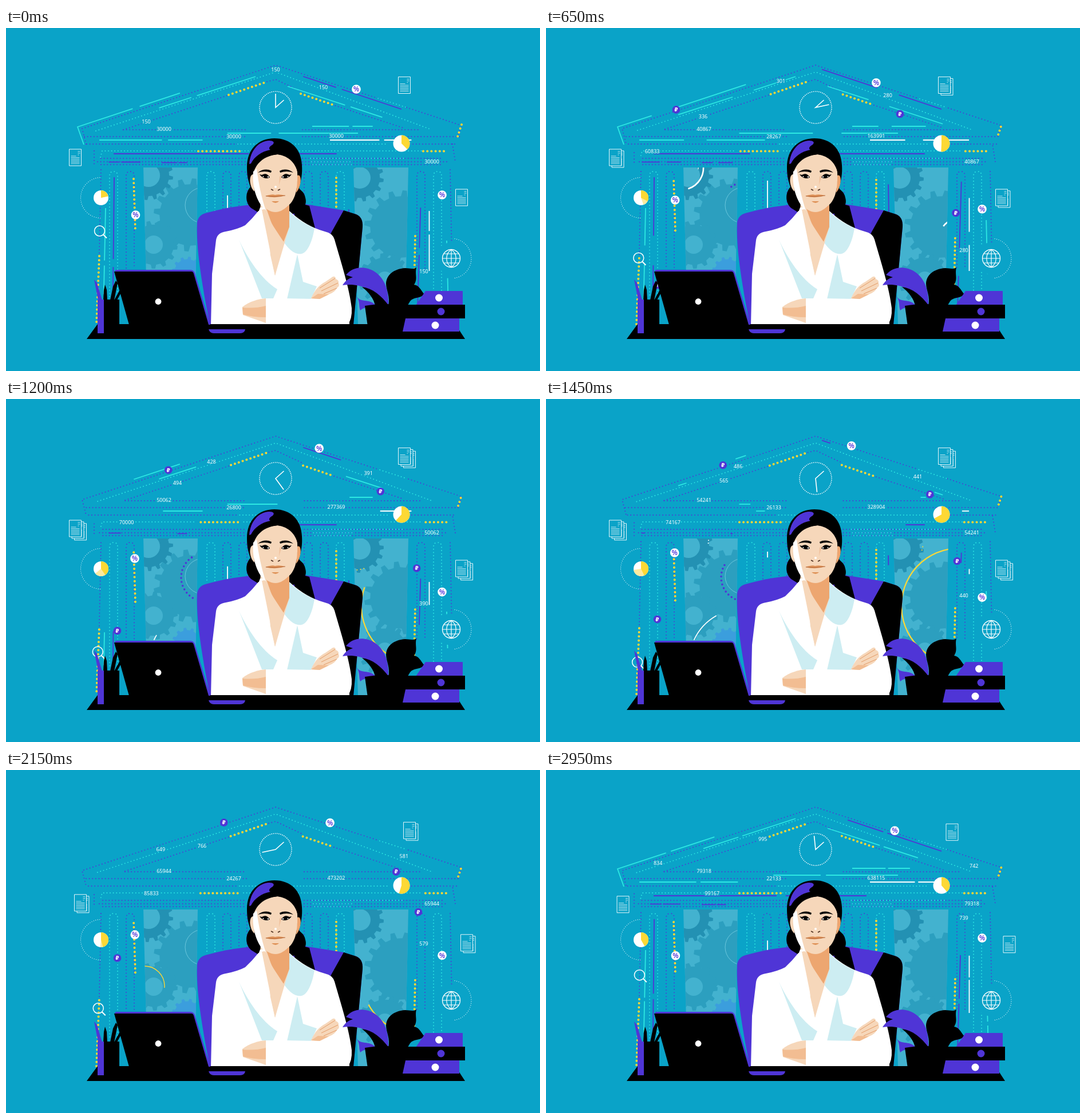
These frames come from a looping animation (933x600 px, 3000 ms). An HTML page with a canvas:

```html
<!DOCTYPE html>
<html lang="en">
<head>
<meta charset="utf-8">
<title>Bank manager</title>
<style>
html, body { margin: 0; width: 100%; height: 100%; overflow: hidden; background: #0aa3c8; }
canvas { display: block; }
</style>
</head>
<body>
<canvas id="stage" width="933" height="600"></canvas>
<script>
const c = document.getElementById('stage').getContext('2d');
const LOOP = 3000, STEP = 50, TAU = Math.PI * 2, AXIS = 471;
const BG = '#0aa3c8', BLUE = '#4f35d6', CYAN = '#2de8e2', YELLOW = '#fdd835', WHITE = '#fff', BLACK = '#000';
const SKIN = '#f6d7ba', TAN = '#eda670', PALE = '#cdedf2', PEACH = '#f2bd92', LIP = '#df9258';

const clamp = v => Math.max(0, Math.min(1, v));
const mix = (a, b, u) => a + (b - a) * u;
const rad = deg => deg * Math.PI / 180;
// Rises to 1 at the peak, falls back to 0 at the end of the loop
const swing = (t, peak) => t < peak ? t / peak : (LOOP - t) / (LOOP - peak);

function fill(d, color) {
  c.fillStyle = color;
  c.fill(new Path2D(d));
}

function stroke(path, color, width, dash = [], offset = 0) {
  c.strokeStyle = color;
  c.lineWidth = width;
  c.lineCap = dash[0] === 0 ? 'round' : 'butt';
  c.setLineDash(dash);
  c.lineDashOffset = offset;
  c.stroke(typeof path === 'string' ? new Path2D(path) : path);
}

function disc(x, y, r, color) {
  c.fillStyle = color;
  c.beginPath();
  c.arc(x, y, r, 0, TAU);
  c.fill();
}

function ring(x, y, r, color, width, from = 0, to = 360, gap = 0) {
  const path = new Path2D();
  path.arc(x, y, r, rad(from), rad(to));
  stroke(path, color, width, gap ? [0, gap] : []);
}

function label(text, x, y, color, font) {
  c.font = font;
  c.textAlign = 'center';
  c.fillStyle = color;
  c.fillText(text, x, y);
}

// ---- Windows with gears ----
function gear(x, y, r, teeth, color, turn, hole = 0) {
  const pitch = TAU / teeth;
  c.beginPath();
  for (let i = 0; i < teeth; i++) {
    for (const [p, k] of [[0, .84], [.12, 1], [.42, 1], [.54, .84]]) {
      const a = (turn + i + p) * pitch;
      c.lineTo(x + r * k * Math.cos(a), y + r * k * Math.sin(a));
    }
  }
  c.closePath();
  c.moveTo(x + hole, y);
  c.arc(x, y, hole, 0, TAU, true);
  c.fillStyle = color;
  c.fill('evenodd');
}

// An arc that grows from one angle to another, waits, and shrinks after its start
function sweep(t, start, span, x, y, r, a, b, color, width, gap) {
  const s = (t - start) / span;
  const p = mix(a, b, clamp((s - .75) / .25)), q = mix(a, b, clamp(s / .6));
  if (s > 0 && s < 1) ring(x, y, r, color, width, Math.min(p, q), Math.max(p, q), gap);
}

function drawWindows(t) {
  const turn = t / LOOP * 4, deep = '#2391b3', mid = '#2c9fbf';
  c.save();
  c.clip(new Path2D('M240 244H335L330 519H247ZM607 244H703L697 519H615Z'));
  fill('M230 240H710V520H230Z', '#43b2cf');
  gear(322, 327, 64, 16, mid, -turn);
  gear(249, 258, 43, 16, deep, turn, 20);
  gear(258, 379, 42, 13, mid, turn, 16);
  gear(317, 427, 27, 12, '#3b9edd', -turn);
  ring(344, 310, 31, '#6bc6dc', 1);
  gear(690, 348, 64, 16, mid, -turn);
  gear(618, 262, 42, 15, deep, turn, 19);
  gear(662, 440, 46, 14, mid, turn, 14);

  sweep(t, 50, 1150, 237, 245, 38, -10, 85, WHITE, 2.6);
  sweep(t, 600, 550, 237, 245, 29, -10, 85, WHITE, 1.2);
  sweep(t, 1400, 500, 240, 246, 44, -5, 85, WHITE, 2, 5);
  sweep(t, 600, 1050, 348, 312, 42, 245, 115, BLUE, 3.6, 7);
  sweep(t, 1150, 850, 345, 462, 95.5, 205, 265, WHITE, 1.6);
  sweep(t, 1900, 400, 242, 378, 35, -90, 5, YELLOW, 1.4);
  sweep(t, 600, 500, 722, 368, 35, 235, 130, WHITE, 2.6);
  for (const start of [700, 1400]) sweep(t, start, 530, 610, 250, 49, 10, 90, YELLOW, 2, 6);
  sweep(t, 900, 900, 722, 362, 101, 120, 262, YELLOW, 2.2);
  sweep(t, 1900, 600, 722, 362, 101, 120, 165, YELLOW, 2.2);
  c.restore();
}

// ---- Dotted building ----
function drawBuilding(t) {
  const dots = (d, color, width = 1.9, gap = 5.6) => stroke(d, color, width, [0, gap], t / LOOP * 16 * gap);
  const arch = (x, foot, color) => dots(`M${x} ${foot}V259Q${x} 251 ${x + 7} 251T${x + 14} 259V${foot}`, color);

  // Roof
  dots('M140 203L133 176L471 65L650 123M700 139L797 171L788 190', BLUE);
  dots('M157 180L471 77L744 178M650 123L700 139', CYAN);
  dots('M205 178L390 117M456 94L471 90L516 111M570 134L695 175', BLUE);

  // Beams
  for (const [y, inset] of [[178, 205], [190, 137], [228, 166], [234, 160], [239, 166]]) {
    dots(`M${inset} ${y}H420M518 ${y}H${930 - inset}`, BLUE);
  }
  dots('M141 203H405M700 203H787M154 215V240M780 203L785 234', BLUE);
  dots('M405 203H668M165 226L168 215H333M412 215H728', CYAN);
  dots('M532 228H696M534 234H606M536 239H606', CYAN);

  // Columns, mirrored around the middle
  for (const side of [1, -1]) {
    c.save();
    c.translate(AXIS, 0);
    c.scale(side, 1);
    c.translate(-AXIS, 0);
    dots('M166 248L163 398', BLUE);
    arch(181, 470, CYAN);
    arch(210, 420, BLUE);
    arch(351, 320, CYAN);
    arch(379, 316, BLUE);
    arch(407, 316, BLUE);
    c.restore();
  }

  for (const d of ['M389 117L456 94', 'M515 115L572 134.5', 'M336 215.5H410', 'M729 215.5H770', 'M796 169L789 190',
    'M223 264L226 356', 'M163 399L158 518', 'M715 364L713 452', 'M577 262V318']) dots(d, YELLOW, 4, 7.2);

  ring(166, 297, 35.5, WHITE, 1.2, 92, 268, 3.6);
  ring(778, 403, 35, WHITE, 1.2, -80, 80, 3.6);
}

// ---- Running lines: pulses travel along each path ----
const meter = document.createElementNS('http://www.w3.org/2000/svg', 'path');
const runs = Object.entries({
  [CYAN]: 'M136 204L125 173L358 96 M436 85L224 154 M492 102L700 170 M535 172H668 M615 184H328 M163 196H390 M174 315L170 505 M774 539L769 329',
  [BLUE]: 'M691 142L475 70 M188 220H678 M235 234.5H165 M272 235.5H328 M189 261L186 558 M602 520L598 265 M718 525L726 260',
  [WHITE]: 'M566 196H745 M387 412V262 M739.5 425V293'
}).flatMap(([color, paths]) => paths.split(' M').map(d => {
  d = d.replace(/^M?/, 'M');
  meter.setAttribute('d', d);
  return { color, path: new Path2D(d), length: meter.getTotalLength() };
}));
// front start, tail start, tail duration
const pulses = [[2200, 2545, 860], [2600, 3136, 992], [3400, 3900, 612]];

function drawRuns(t) {
  const time = t < 2000 ? t + LOOP : t;
  c.save();
  c.beginPath();
  c.rect(0, 0, 933, 518);
  c.clip();
  for (const [start, tailStart, span] of pulses) {
    const front = clamp((time - start) / 1100) ** .72, tail = clamp((time - tailStart) / span);
    if (front <= tail) continue;
    for (const { color, path, length } of runs) {
      stroke(path, color, 1.8, [(front - tail) * length, 9999], -tail * length);
    }
  }
  c.restore();
}

// ---- Counters: position and value at both ends of the loop ----
function drawCounters(t) {
  c.save();
  c.beginPath();
  c.rect(170, 0, 763, 600);
  c.clip();
  const count = (x0, y0, x1, y1, from, to) => {
    const u = t / LOOP, x = mix(x0, x1, u), y = mix(y0, y1, u);
    const text = String(Math.round(mix(from, to, u))), half = text.length * 2.6 + .5;
    c.fillStyle = BG;
    c.fillRect(x - half, y - 4.5, half * 2, 9);
    label(text, x, y + 3.3, WHITE, '9px "Noto Sans", "Open Sans", sans-serif');
  };
  count(471, 73, 191, 164.5, 150, 846);
  count(245, 164, 381, 120, 150, 1009);
  count(276, 177, 276, 177, 30000, 80154);
  count(744, 234, 744, 234, 30000, 80154);
  count(398, 189.5, 398, 189.5, 30000, 22000);
  count(577, 189, 577, 189, 30000, 648422);
  count(554.5, 104, 751, 169, 150, 752);
  count(730, 426, 730, 256, 150, 749);
  count(156, 215.5, 292.5, 215.5, 50000, 100000);
  c.restore();
}

// ---- Icons ----
function coin(x, y, size) {
  c.save();
  c.translate(x, y);
  c.scale(size, size);
  disc(0, 0, 6.8, BLUE);
  label('₽', 0, 3.4, WHITE, 'bold 9px "DejaVu Sans", sans-serif');
  c.restore();
}

function percent(x, y) {
  disc(x, y, 7.8, WHITE);
  label('%', x, y + 4.3, BLUE, '600 12px "Open Sans", "Noto Sans", sans-serif');
}

function slice(x, y, r, angle, color) {
  c.fillStyle = color;
  c.beginPath();
  c.moveTo(x, y);
  c.arc(x, y, r, rad(-90), rad(angle - 90));
  c.fill();
}

function sheet(x, y) {
  c.fillStyle = BG;
  c.fillRect(x, y, 21, 29);
  let d = `M${x + 15} ${y + 4}h4m-4 3h4m-4 3h2`;
  for (let i = 0; i < 6; i++) d += `M${x + 3} ${y + 12 + i * 2.6}h${i ? 15 : 9}`;
  stroke(`M${x} ${y}h21v29h-21z`, WHITE, .9);
  stroke(d, WHITE, .7);
}

// Sheets are added behind the stack, then taken from its front
function sheets(x, y, t) {
  for (let k = 3; k >= 0; k--) {
    const added = k === 0 || t >= 150 + k * 450, taken = k < 3 && t >= 1500 + k * 450;
    if (added && !taken) sheet(x + k * 4.5, y + k * 2.9);
  }
}

function drawIcons(t) {
  const u = swing(t, LOOP / 2), late = swing(t, 1600);
  const size = Math.min(clamp(t / 600), clamp((2900 - t) / 400));

  // Clock
  const a = t / LOOP * TAU;
  ring(AXIS, 139, 28, WHITE, 1.7, 0, 360, 3.2);
  stroke(`M485.5 126L471 139l${24 * Math.sin(a)} ${-24 * Math.cos(a)}`, WHITE, 1.6);

  // Pies
  disc(691, 202, 14.5, WHITE);
  slice(691, 202, 14.5, 135 + 110 * u, YELLOW);
  disc(166, 297, 13, WHITE);
  slice(166, 297, 13, 78 + 190 * u, '#fdeaa0');
  slice(166, 297, 13, 78 + 87 * Math.sin(Math.PI * t / 4300), YELLOW);

  sheets(110.5, 212, t);
  sheets(685.5, 85.5, t);
  sheets(785.5, 282, t);

  // Globe
  disc(778, 403, 28, BG);
  ring(778, 403, 15.5, WHITE, 1.3);
  stroke('M762.5 403H793.5M778 387.5V418.5M765 395H791M765 411H791' +
    'M778 387.5C767 395 767 411 778 418.5C789 411 789 395 778 387.5', WHITE, 1.2);

  coin(161 + .1022 * t, 165 - .034 * t, size);
  coin(699 - Math.abs(.0653 * t - 123), Math.min(178, 137 + .0206 * t), size);
  coin(714 + .003 * t, 356 - .05 * t, size);
  coin(194.5, 502 - .0805 * t, size);

  percent(612 - 81 * u, 107 - 26 * u);
  percent(226.5 - 2 * late, 327 - 64 * late);
  percent(762, 292 + 57 * u);

  // Magnifier
  const x = 163.5 - 4 * u, y = 355 + 109 * u;
  ring(x, y, 9, WHITE, 1.5);
  stroke(`M${x + 6.5} ${y + 6.5}l6 6`, WHITE, 2);
}

// ---- Foreground ----
function drawChair() {
  fill('M356 519C341 440 332 385 334 340Q336 326 352 323C395 311 430 308 470 307L522 308L590 319L612 326Q624 331 623 348L607 519Z', BLUE);
  fill('M500 308L522 309L530 311L541 354L566 362L590 319L612 326Q624 331 623 348L607 519H560L520 400Z', BLACK);
}

function drawWoman() {
  // Hair
  fill('M469 193C440 193 421 213 421 243C421 262 424 268 427 278C417 289 418 308 430 316L446 326H497C518 322 527 310 523 297C521 286 515 285 512 280C516 265 518 255 517 240C516 212 498 193 469 193Z', BLACK);

  // Jacket
  fill('M441 320Q430 334 418 345Q405 352 384 356Q369 358 367 371L360 430L358 519H597Q605 509 604 490C600 455 586 412 574 370Q571 359 557 356Q524 347 495 320Z', WHITE);
  fill('M495 321C512 338 528 345 539 350C535 374 527 393 516 395C504 397 493 386 485 374L495 347Z', PALE);
  fill('M407 370C420 400 446 440 474 457L467 473H447Z', PALE);
  fill('M509 396L491 474H533L543 452L519 444Z', PALE);

  // Neck
  fill('M445 304L444 318L470 433L495 348V300Z', SKIN);
  fill('M454 315Q470 326 495 300V348L485 374C475 362 461 340 454 315Z', TAN);
  fill('M444 314L452 313L457 332L462 398L441 322Z', WHITE);
  fill('M447 318L455 316L464 342L485 374L470 433Z', SKIN);

  // Ears and face
  fill('M433 256C424 254 424 277 434 286Z', SKIN);
  fill('M509 258C517 254 517 276 507 288Z', TAN);
  fill('M432 254C437 238 448 224 475 221C494 223 507 236 509 252C510 280 506 296 497 307C487 317 479 322 471 322C461 322 452 316 445 306C436 293 431 275 432 254Z', SKIN);
  fill('M432 251L438 246C441 270 446 296 454 319C440 308 429 280 432 251Z', WHITE);
  fill('M428 254C434 237 447 224 474 221C495 224 507 237 511 258C517 220 498 205 474 205C446 206 428 222 428 254Z', BLACK);
  fill('M425 238C427 214 441 198 460 197C467 197 470 200 466 204C460 207 458 211 462 213C446 216 434 225 428 237Z', BLUE);

  // Brows and eyes
  for (const side of [-1, 1]) {
    c.save();
    c.translate(AXIS, 0);
    c.scale(side, 1);
    fill('M7 250Q19 244 31 253Q19 249 8 253Z', BLACK);
    fill('M10 261Q16 252 24 257L28 256Q24 262 17 263Q12 263 10 261Z', BLACK);
    disc(13, 260.5, 1.2, WHITE);
    disc(21.5, 260, 1, WHITE);
    c.restore();
  }

  // Nose and mouth
  fill('M478 260L482 257L477 275Z', '#f0c09b');
  disc(471, 278, 2, WHITE);
  stroke('M463 282l4 2M475 284l4 -2', '#4a2a1a', 1.5);
  fill('M453 294Q465 290 470 292Q477 290 488 293Q471 299 453 294Z', LIP);
  stroke('M454 294Q471 296 488 293', '#a85f36', .8);
  fill('M464 303H477Q471 309 464 303Z', LIP);

  // Arms and hands
  fill('M454 475L490 473L540 474L600 470V519H454Z', WHITE);
  fill('M413 488C426 478 441 474 454 473V516L414 502Z', SKIN);
  fill('M413 489Q435 491 454 486V506Q430 506 414 501Z', PEACH);
  fill('M533 473C540 457 548 449 558 444L571 435Q576 434 576 439Q582 441 581 446Q584 451 578 455Q575 462 564 466L548 474Z', SKIN);
  fill('M533 473L545 465L564 466L548 474Z', PEACH);
  stroke('M548 455L575 438M551 460L580 446M555 465L578 455', '#e49b66', 1);
}

function drawDesk() {
  // Plant
  fill('M588 450C592 443 598 438 606 436L594 432C604 420 618 417 633 421C655 428 670 450 668 486C655 480 640 470 632 457C618 449 602 448 588 450Z', BLUE);
  fill('M622 453C640 455 656 468 669 486H645C643 474 634 462 622 453Z', BLACK);
  fill('M613 470C620 481 634 473 645 484C637 489 626 487 619 494C616 487 619 480 613 470Z', BLUE);
  fill('M668 486C672 470 664 458 664 447C665 432 676 424 690 421C702 418 709 424 717 419C714 431 720 439 713 449C722 450 724 458 731 466C722 474 712 470 706 478L700 488Z', BLACK);
  fill('M627 486Q660 480 705 486L699 522H632Z', BLACK);

  // Desk and folders
  fill('M160 518H785L802 544H141Z', BLACK);
  fill('M733 460H798V485H716Z', BLUE);
  fill('M690 484H802V508H690Z', BLACK);
  fill('M698 508H792V531H693Z', BLUE);
  disc(756.5, 472, 6.5, WHITE);
  disc(760, 496, 6.5, BLUE);
  disc(750, 520, 6.5, WHITE);

  // Laptop
  fill('M190 425L192 423H322Q328 423 330 429L357 519H216Z', BLUE);
  fill('M189 426H324Q327 426 328 430L354 519H215Z', BLACK);
  disc(266, 478.5, 5.4, WHITE);
  fill('M354 527H418Q417 534 409 534H363Q356 534 354 527Z', BLUE);

  // Pens and cup
  fill('M154 440L159 446L168 476H161Z', BLUE);
  fill('M173 449L176 458L177 476H170L171 458Z', BLACK);
  fill('M192 442L195 446L189 476H182L187 452Z', BLACK);
  fill('M199 458L201 463L194 476H189Z', BLACK);
  fill('M171 475H198V520H171Z', BLACK);
  fill('M160 475H171V534H160Z', BLUE);
}

const start = performance.now();
function draw(now) {
  const t = Math.floor(Math.max(0, now - start) % LOOP / STEP) * STEP;
  c.fillStyle = BG;
  c.fillRect(0, 0, 933, 600);
  drawWindows(t);
  drawBuilding(t);
  drawRuns(t);
  drawCounters(t);
  drawIcons(t);
  drawChair();
  drawWoman();
  drawDesk();
  requestAnimationFrame(draw);
}
draw(start);
</script>
</body>
</html>
```
